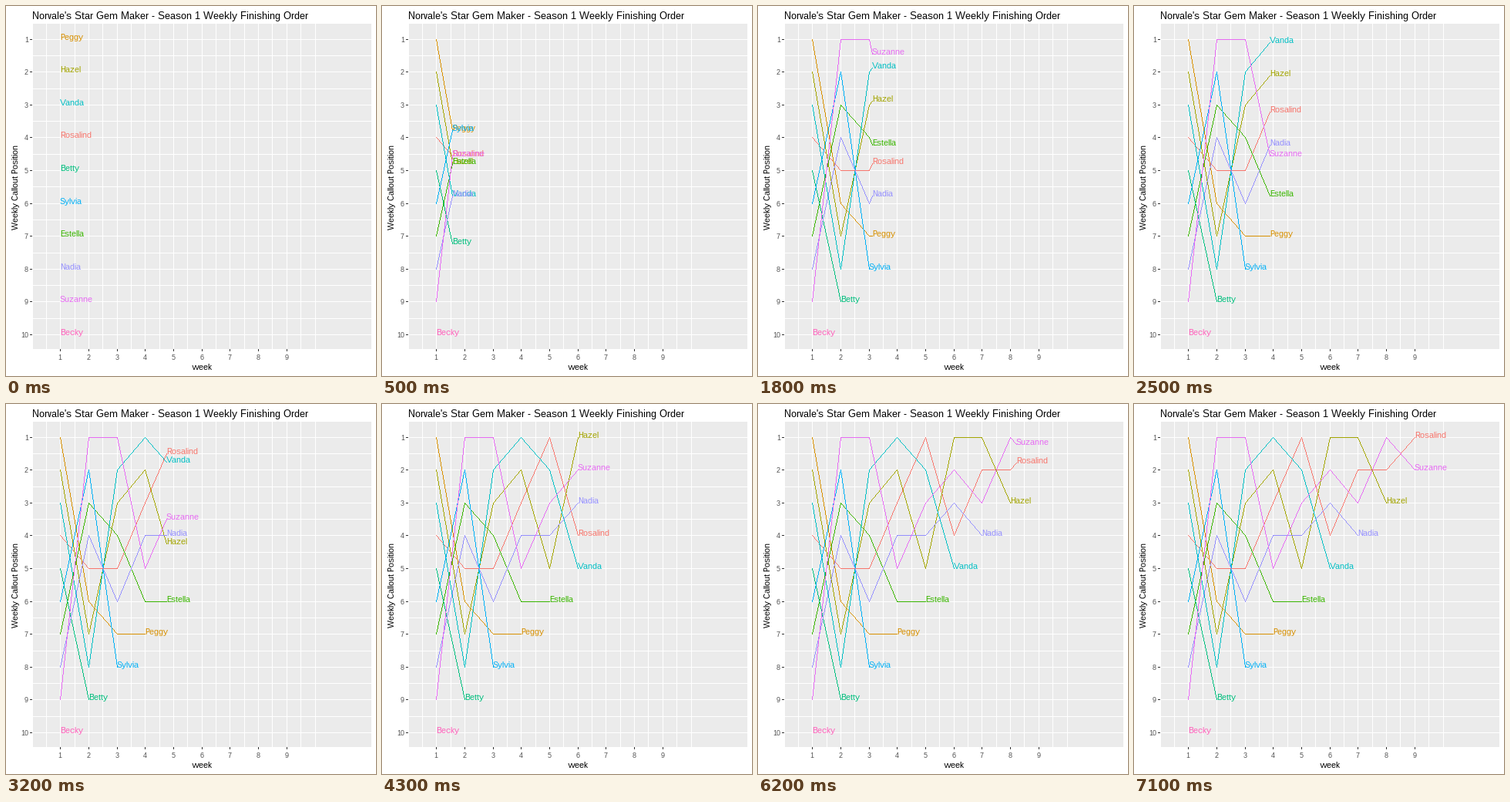
Animation of 480x480 px, one loop 10 s. Source, as a matplotlib script:

```python
import numpy as np
import matplotlib.pyplot as plt
from matplotlib.animation import FuncAnimation
from matplotlib.colors import to_rgb

plt.rcParams["font.family"] = "Liberation Sans"
plt.rcParams["text.hinting"] = "native"
plt.rcParams["text.hinting_factor"] = 1

SIZE, DPI = 480, 80
PX = 72 / DPI  # points per pixel
LEFT, RIGHT, TOP, BOTTOM = 34, 474, 23, 445
REVEAL = 69  # frame on which the last week is reached

# name, colour, weekly positions
RANKS = [
    ("Rosalind", "#F8766D", [4, 5, 5, 3, 1, 4, 2, 2, 1]),
    ("Peggy", "#D89000", [1, 6, 7, 7]),
    ("Hazel", "#A3A500", [2, 7, 3, 2, 5, 1, 1, 3]),
    ("Estella", "#39B600", [7, 3, 4, 6, 6]),
    ("Betty", "#00BF7D", [5, 9]),
    ("Vanda", "#00BFC4", [3, 8, 2, 1, 2, 5]),
    ("Sylvia", "#00B0F6", [6, 2, 8]),
    ("Nadia", "#9590FF", [8, 4, 6, 4, 4, 3, 4]),
    ("Suzanne", "#E76BF3", [9, 1, 1, 5, 3, 2, 3, 1, 2]),
    ("Becky", "#FF62BC", [10]),
]
WEEKS = np.arange(1, 10)
MARKS = np.round(REVEAL * (WEEKS - 1) / 8)


def px(week):
    return np.floor(34 + 36.7 * np.asarray(week)).astype(int)


def py(rank):
    return np.floor(43.1 + 42.6 * (np.asarray(rank) - 1)).astype(int)


def line(canvas, x0, y0, x1, y1, color):
    """Hard-edged line, one pixel wide, both ends included."""
    n = max(abs(x1 - x0), abs(y1 - y0)) + 1
    xs = np.rint(np.linspace(x0, x1, n)).astype(int)
    ys = np.rint(np.linspace(y0, y1, n)).astype(int)
    canvas[ys, xs] = to_rgb(color)


def draw_panel():
    canvas = np.ones((SIZE, SIZE, 3))
    canvas[TOP:BOTTOM, LEFT:RIGHT] = to_rgb("#EBEBEB")
    for x in px(np.arange(0, 10.5, 0.5)):
        line(canvas, x, TOP, x, BOTTOM - 1, "white")
    for y in py(np.arange(1, 10.5, 0.5)):
        line(canvas, LEFT, y, RIGHT - 1, y, "white")
    for x in px(WEEKS):
        line(canvas, x, BOTTOM, x, BOTTOM + 2, "#333333")
    for y in py(np.arange(1, 11)):
        line(canvas, LEFT - 3, y, LEFT - 1, y, "#333333")
    return canvas


fig = plt.figure(figsize=(SIZE / DPI, SIZE / DPI), dpi=DPI, facecolor="white")
ax = fig.add_axes([0, 0, 1, 1])
ax.axis("off")
panel = draw_panel()
picture = ax.imshow(panel, extent=(0, SIZE, SIZE, 0), aspect="auto",
                    interpolation="nearest")


def text(x, y, s, size, color="black", ha="left", **kw):
    return ax.text(x, y, s, fontsize=size * PX, color=color, ha=ha,
                   va="baseline", **kw)


for w in WEEKS:
    text(px(w), 459, str(w), 9, "#4D4D4D", ha="center")
for r in range(1, 11):
    text(29, py(r) + 4, str(r), 9, "#4D4D4D", ha="right")
text(34, 17, "Norvale's Star Gem Maker - Season 1 Weekly Finishing Order", 13)
text(254, 472, "week", 11, ha="center")
text(16, 235, "Weekly Callout Position", 11, ha="center", rotation=90,
     rotation_mode="anchor")
labels = [text(0, 0, name, 11, color) for name, color, _ in RANKS]


def update(n):
    now = np.interp(n, MARKS, WEEKS)
    canvas = panel.copy()
    for (_, color, ranks), label in zip(RANKS, labels):
        week = min(now, len(ranks))
        weeks = np.append(WEEKS[WEEKS < week], week)
        xs = px(weeks)
        ys = py(np.interp(weeks, WEEKS[:len(ranks)], ranks))
        for x0, y0, x1, y1 in zip(xs, ys, xs[1:], ys[1:]):
            line(canvas, x0, y0, x1, y1, color)
        label.set_position((xs[-1], ys[-1] + 1))
    picture.set_data(canvas)
    return [picture, *labels]


anim = FuncAnimation(fig, update, frames=100, interval=100, repeat=True,
                     repeat_delay=0, init_func=lambda: update(0), blit=False)
plt.show()
```
